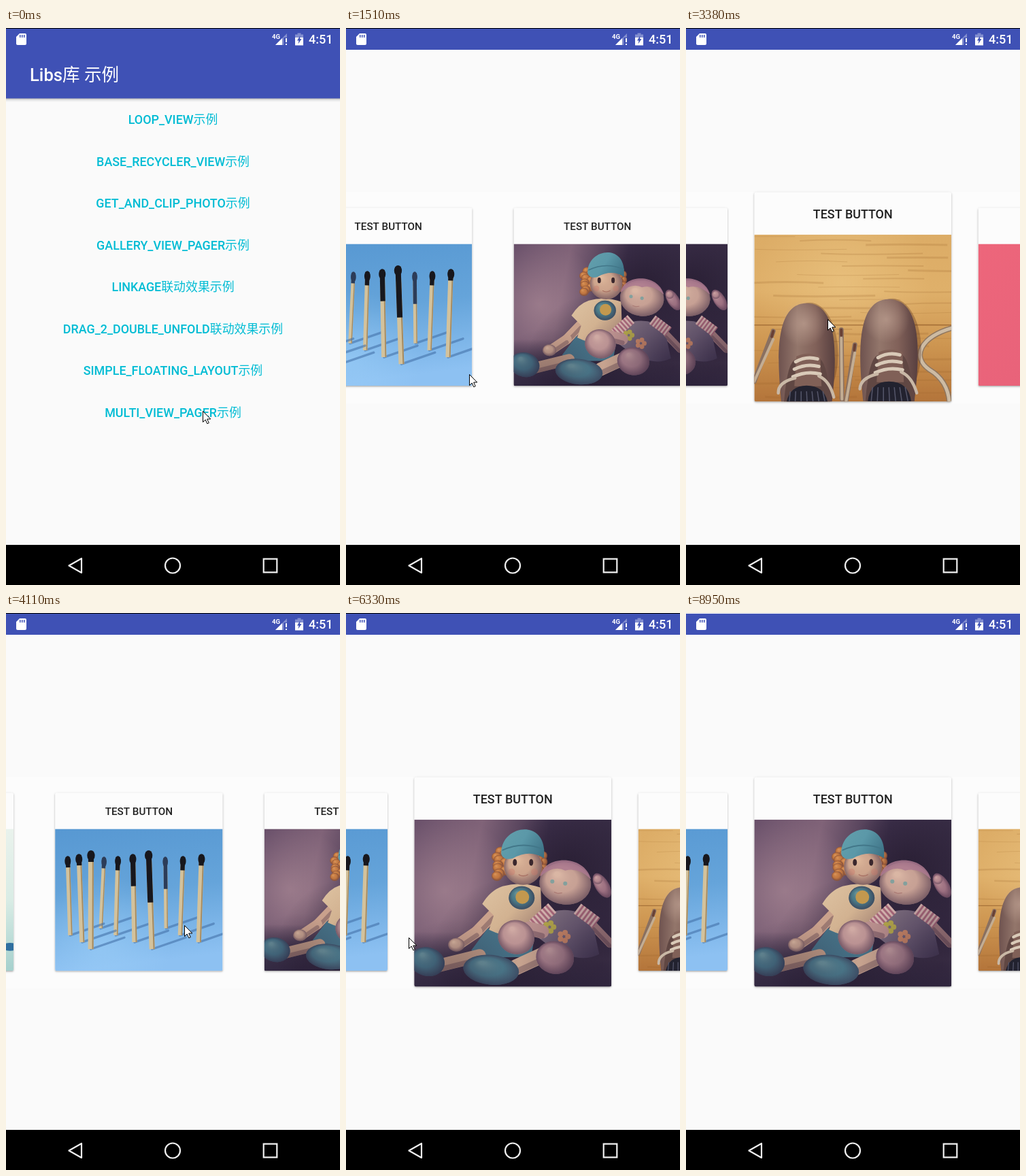
Animation, 491 px wide and 819 px high, one loop 9050 ms. Source, as an HTML page with a canvas:

```html
<!DOCTYPE html>
<html lang="zh-CN">
<head>
<meta charset="utf-8">
<title>View pager</title>
<style>
html, body { margin: 0; width: 100%; height: 100%; overflow: hidden; background: #fafafa; }
canvas { display: block; }
</style>
</head>
<body>
<canvas id="stage" width="491" height="819"></canvas>
<script>
const c = document.getElementById('stage').getContext('2d');
const W = 491, LOOP = 9050, TAU = Math.PI * 2;
const FONT = 'Roboto, "Noto Sans CJK SC", "Noto Sans CJK JP", "Noto Sans CJK", sans-serif';
const BLUE = '#3f51b5', PAPER = '#fafafa', VEIL = 'rgba(255,255,255,.35)';
const CENTER = 245.25, MIDDLE = 395.2, GAP = 307.5;
const HALF = 145, TOP = -154, SPLIT = -91.5, BOTTOM = 154;

const MENU = ['LOOP_VIEW示例', 'BASE_RECYCLER_VIEW示例', 'GET_AND_CLIP_PHOTO示例', 'GALLERY_VIEW_PAGER示例',
  'LINKAGE联动效果示例', 'DRAG_2_DOUBLE_UNFOLD联动效果示例', 'SIMPLE_FLOATING_LAYOUT示例', 'MULTI_VIEW_PAGER示例'];

// The screen only refreshes within these spans, about every STEP ms.
const STEP = 134;
const SPANS = [[460, 1510, 2840], [3140, 3380, 4110, 5380, 7260], [7510, 7780], [8080, 8330], [8950]];

// Swipes: start, page reached, duration.
const SWIPES = [[1000, 1], [1379, 2], [1720, 3], [2060, 4], [3020, 3], [3420, 2], [3895, 1], [4260, 0],
  [4700, 1], [5159, 2], [5540, 3], [5940, 2], [6330, 2.384, 930], [7420, 2]];

// Pointer stops: time, x, y.
const STOPS = [[600, 289, 563], [1510, 181, 509], [2420, 208, 273], [2840, 307, 273], [3380, 208, 428],
  [4110, 262, 459], [5380, 204, 474], [7260, -20, 480]];

function refreshed(clock) {
  let last = 0;
  for (const marks of SPANS) marks.forEach((b, i) => {
    const a = i ? marks[i - 1] : b, n = Math.max(1, Math.round((b - a) / STEP));
    for (let j = 1; j <= n; j++) {
      const tick = Math.round(a + (b - a) * j / n);
      if (tick <= clock) last = tick;
    }
  });
  return last;
}

function pageAt(t) {
  let page = 0;
  for (const [start, target, span = 360] of SWIPES) {
    const k = Math.min(1, Math.max(0, (t - start) / span));
    page += (target - page) * k * (2 - k);
  }
  return page;
}

function pointerAt(t) {
  const i = Math.max(1, STOPS.findIndex(s => s[0] >= t));
  const [t0, x0, y0] = STOPS[i - 1], [t1, x1, y1] = STOPS[i];
  const p = Math.max(0, (t - t0) / (t1 - t0)), k = p * p * (3 - 2 * p);
  return [x0 + (x1 - x0) * k, y0 + (y1 - y0) * k];
}

function rect(color, x, y, w, h) {
  c.fillStyle = color;
  c.fillRect(x, y, w, h);
}
function oval(color, x, y, rx, ry = rx, turn = 0) {
  c.fillStyle = color;
  c.beginPath();
  c.ellipse(x, y, rx, ry, turn, 0, TAU);
  c.fill();
}
function trace(pts) {
  c.beginPath();
  for (let i = 0; i < pts.length; i += 2) c.lineTo(pts[i], pts[i + 1]);
}
function poly(color, ...pts) {
  c.fillStyle = color;
  trace(pts);
  c.fill();
}
function line(color, width, ...pts) {
  c.strokeStyle = color;
  c.lineWidth = width;
  trace(pts);
  c.stroke();
}
function curve(color, width, path) {
  c.strokeStyle = color;
  c.lineWidth = width;
  c.stroke(new Path2D(path));
}
function shape(color, path) {
  c.fillStyle = color;
  c.fill(new Path2D(path));
}
function fade(x0, y0, x1, y1, ...colors) {
  const g = c.createLinearGradient(x0, y0, x1, y1);
  colors.forEach((v, i) => g.addColorStop(i / (colors.length - 1), v));
  return g;
}
function glow(rgb, alpha, x, y, r) {
  const g = c.createRadialGradient(x, y, 0, x, y, r);
  g.addColorStop(0, `rgba(${rgb},${alpha})`);
  g.addColorStop(1, `rgba(${rgb},0)`);
  rect(g, x - r, y - r, r * 2, r * 2);
}
// Oval lit from the upper left.
function ball(color, x, y, rx, ry = rx, turn = 0) {
  oval(color, x, y, rx, ry, turn);
  c.save();
  c.translate(x, y);
  c.rotate(turn);
  c.scale(rx, ry);
  const g = c.createRadialGradient(-.35, -.4, .1, 0, 0, 1);
  g.addColorStop(0, 'rgba(255,235,205,.16)');
  g.addColorStop(.55, 'rgba(60,30,60,.08)');
  g.addColorStop(1, 'rgba(45,25,55,.5)');
  oval(g, 0, 0, 1);
  c.restore();
}
function limb(color, width, x0, y0, x1, y1) {
  line(color, width, x0, y0, x1, y1);
  line('rgba(55,30,55,.3)', width * .4, x0, y0 + width * .3, x1, y1 + width * .3);
}
function text(s, x, y, size, color, align = 'center', weight = 500) {
  c.font = `${weight} ${size}px ${FONT}`;
  c.textAlign = align;
  c.fillStyle = color;
  c.fillText(s, x, y);
}

// Photos are painted on a 290 x 246 area.
function seaside() {
  rect(fade(0, 0, 0, 246, '#e9f2ec', '#d9ece5', '#a5d0cd'), 0, 0, 290, 246);
  oval('#2f6fa0', 284, 204, 14, 7);
}

function match(i, near) {
  const x = 22 + 18.5 * i + .8 * i * i, y = 50 - 1.2 * near * near;
  const fx = x + 6 * Math.sin(1.2 * i + .8), fy = 172 + 12 * near;
  const w = 6.5 + near, char = near ? '#17171d' : '#2c3c58';
  const burnt = 18 + 70 * Math.exp(-((i - 6) ** 2) / 1.5), p = burnt / (fy - y);
  c.lineCap = 'round';
  line('rgba(62,108,165,.55)', 4, fx, fy, fx + 58, fy - 20);
  c.lineCap = 'butt';
  line('#d3c29c', w, x, y, fx, fy);
  line('#a58a60', w * .25, x + w * .36, y, fx + w * .36, fy);
  line(char, w, x, y, x + (fx - x) * p, y + burnt);
  oval(char, x, y + 7, w * .7, 9);
}
function matches() {
  rect(fade(0, 0, 30, 246, '#5798d2', '#65a4da', '#8dc1f2'), 0, 0, 290, 246);
  glow('160,210,250', .5, 80, 200, 120);
  for (let near = 0; near < 4; near++)
    for (let i = 0; i < 10; i++) if ((i + 1) % 4 === near) match(i, near);
}

function boy() {
  c.lineCap = 'round';
  limb('#c9a18c', 17, 116, 140, 92, 165);
  limb('#c9a18c', 17, 92, 165, 64, 184);
  ball('#d3ad96', 62, 184, 12, 10);
  shape('#456f84', 'M108 160 L178 165 L172 202 L95 203 L84 192 Z');
  limb('#bd9883', 19, 96, 200, 35, 215);
  ball('#477a8d', 19, 209, 26, 21, .25);
  limb('#c7a38f', 23, 187, 200, 150, 217);
  ball('#4d8394', 113, 221, 41, 22, .1);
  shape(fade(110, 100, 180, 170, '#dcc09f', '#d2b291', '#9c7c70'),
    'M130 98 Q158 90 186 100 L188 168 Q146 180 110 162 L117 141 L100 124 Q112 104 130 98 Z');
  ball('#4a818d', 158, 115, 19, 17);
  oval('#c2984e', 159, 114, 10);
  for (let i = 0; i < 10; i++) {
    ball('#cf8040', 127 + 7 * Math.sin(i * 2), 47 + i * 4, 8, 7);
    ball('#b9703c', 187 + 4 * Math.sin(i * 2), 50 + i * 3, 5, 6);
  }
  ball('#dab093', 160, 69, 28, 27);
  for (const x of [148, 172]) {
    oval('#3a272d', x, 63, 3, 5);
    oval('rgba(200,120,105,.4)', x + (x - 160) * .4, 77, 5);
  }
  curve('#a56c5f', 1.2, 'M154 81 Q160 85 167 81');
  shape(fade(128, 12, 191, 50, '#63a0ac', '#5b98a8', '#3d7185'),
    'M128 51 C126 10 188 -2 191 45 L191 57 Q170 43 145 57 Q132 61 128 51 Z');
  curve('#427789', 2, 'M130 45 Q160 31 190 44');
}

function girl() {
  limb('#a98080', 13, 264, 157, 288, 182);
  ball('#a97b8a', 276, 97, 10, 20, -.55);
  ball('#bf9197', 270, 88, 7);
  shape(fade(190, 135, 265, 200, '#80707f', '#6f6077', '#4f4460'),
    'M192 139 Q218 128 243 137 L265 165 L272 198 Q240 214 196 184 L178 170 Z');
  c.lineCap = 'butt';
  for (const arm of [[203, 130, 175, 155], [240, 131, 268, 152]]) {
    line('#a76779', 18, ...arm);
    c.setLineDash([3, 3]);
    line('#d3b2ad', 18, ...arm);
    c.setLineDash([]);
  }
  c.lineCap = 'round';
  ball('#d3ac9c', 222, 94, 38, 31, .1);
  shape('rgba(172,122,144,.85)', 'M185 84 C190 52 250 50 260 88 Q242 70 222 75 Q205 66 185 84 Z');
  oval('#83a09d', 203, 91, 3);
  oval('#83a09d', 222, 94, 3);
  curve('#a5726d', 1, 'M206 107 Q211 110 217 108');
  for (const [color, x, y] of [['#b5a84a', 199, 158], ['#cf8a68', 220, 172]])
    for (let i = 0; i < 5; i++)
      oval(color, x + 6 * Math.cos(i * TAU / 5), y + 6 * Math.sin(i * TAU / 5), 4);
  limb('#b98f8d', 20, 168, 160, 188, 165);
  ball('#c69d9b', 150, 173, 27, 25, .3);
  ball('#b58b95', 207, 203, 28, 24, .2);
}

function dolls() {
  rect(fade(0, 0, 290, 60, '#69506a', '#806378', '#3c2f4a', '#352a42'), 0, 0, 290, 246);
  glow('165,132,146', .75, 45, 105, 110);
  glow('38,28,48', .85, 225, 75, 95);
  rect(fade(0, 165, 0, 246, 'rgba(58,46,70,0)', '#43384f', '#352c45'), 0, 165, 290, 81);
  glow('30,20,40', .6, 150, 215, 130);
  boy();
  girl();
  glow('35,22,45', .45, 275, 215, 120);
  glow('35,22,45', .35, 60, 246, 100);
}

function shoe(x, y, w) {
  c.save();
  c.translate(x, y);
  oval('rgba(70,35,20,.3)', w * .06, 75, w * .52, 76);
  shape(fade(-w / 2, 0, w / 2, 0, '#705450', '#93766b', '#816159', '#5a4141'),
    `M${-w * .46} 150 C${-w * .5} 110 ${-w * .68} 0 0 0 C${w * .68} 0 ${w * .52} 105 ${w * .46} 150 Z`);
  glow('195,165,150', .65, -4, 30, 34);
  shape('#604743', `M${-w * .42} 150 Q${-w * .36} 84 -15 82 L20 82 Q${w * .4} 92 ${w * .44} 150 Z`);
  shape('#806057', 'M-15 78 Q3 70 20 78 L22 122 L-18 122 Z');
  shape('#22222f', `M${-w * .38} 150 Q${-w * .33} 121 0 121 Q${w * .35} 121 ${w * .4} 150 Z`);
  for (let i = 0; i < 7; i++) line('#55566a', 1.5, -24 + i * 8, 130, -26 + i * 9, 150);
  c.lineCap = 'round';
  for (let i = 0; i < 3; i++) {
    const s = 16 + i * 2, ly = 82 + i * 11;
    curve('#d9cab8', 5, `M${-s} ${ly + 4} Q0 ${ly - 5} ${s} ${ly}`);
  }
  curve('#c9b8a6', 4.5, `M-17 110 Q-42 116 ${-w * .52} 132`);
  curve('#c9b8a6', 4.5, `M18 107 Q34 114 ${w * .5} 138`);
  c.restore();
}
function shoes() {
  rect(fade(0, 0, 0, 246, '#dcac66', '#dfb06a', '#cd9550', '#b3743a'), 0, 0, 290, 246);
  glow('240,205,140', .5, 130, 70, 130);
  for (let i = 0; i < 40; i++) {
    const x = (i * 97) % 260 - 30, y = i * 6.2 + 3, d = 3 * Math.sin(i * 5);
    curve('rgba(150,95,40,.2)', 1 + i % 3, `M${x} ${y} q50 ${d} ${90 + i % 5 * 15} 0`);
  }
  line('rgba(125,70,25,.5)', 1.5, 0, 133, 290, 133);
  c.lineCap = 'round';
  for (const [x, y, ex, ey] of [[28, 142, 0, 216], [128, 140, 129, 242], [148, 162, 135, 246]]) {
    line('#8a7060', 7, x, y, ex, ey);
    line('#c3ad93', 4, x, y + 12, ex, ey);
    line('#694035', 4, x, y, x + (ex - x) * .08, y + 8);
  }
  const lace = 'M292 137 C245 150 230 180 258 199 Q286 216 287 250';
  curve('#8f765f', 8, lace);
  curve('#cdbba3', 5, lace);
  shoe(77, 101, 80);
  shoe(198, 95, 82);
}

function pink() {
  rect(fade(0, 0, 290, 246, '#ed667b', '#e9637a', '#e56078'), 0, 0, 290, 246);
}

const PHOTOS = [seaside, matches, dolls, shoes, pink];

function card(photo, offset) {
  const k = Math.max(.85, 1 - Math.abs(offset) / 333);
  c.save();
  c.translate(CENTER + offset, MIDDLE);
  c.scale(k, k);
  c.beginPath();
  c.roundRect(-HALF, TOP, HALF * 2, BOTTOM - TOP, 3);
  c.shadowColor = 'rgba(0,0,0,.34)';
  c.shadowBlur = 2.5;
  c.shadowOffsetY = 1.2;
  c.fillStyle = '#fcfcfc';
  c.fill();
  c.shadowColor = 'transparent';
  c.clip();
  text('TEST BUTTON', 0, -115.5, 17.9, '#212121');
  c.translate(-HALF, SPLIT);
  c.beginPath();
  c.rect(0, 0, 290, 246);
  c.clip();
  photo();
  c.restore();
}

function gallery(page) {
  rect(PAPER, 0, 32, W, 728);
  rect('#fcfcfc', 0, 241, W, 311);
  rect(BLUE, 0, 0, W, 32);
  PHOTOS.forEach((photo, i) => {
    const offset = (i - page) * GAP;
    if (Math.abs(offset) < 380) card(photo, offset);
  });
}

function menu(t) {
  rect(PAPER, 0, 0, W, 760);
  rect(fade(0, 103, 0, 109, 'rgba(0,0,0,.3)', 'rgba(0,0,0,.08)', 'rgba(0,0,0,0)'), 0, 103, W, 6);
  rect(BLUE, 0, 0, W, 103.5);
  text('Libs库 示例', 35, 78, 25.6, '#fff', 'left');
  if (t >= 460) {
    c.save();
    c.beginPath();
    c.rect(5, 543, 481, 46);
    c.clip();
    oval('rgba(0,0,0,.1)', 289, 565, 60 + (t - 460) * .9);
    c.restore();
  }
  MENU.forEach((s, i) => text(s, 245.5, 141.3 + i * 61.5, 17.9, '#00bcd4'));
}

function statusBar() {
  rect(BLUE, 0, 0, W, 32);
  shape('#fff', 'M20 8 H28 Q30 8 30 10 V23 Q30 25 28 25 H17 Q15 25 15 23 V13 Z');
  for (let i = 0; i < 3; i++) rect(BLUE, 20 + i * 3, 10, 1.5, 4);
  text('4G', 391, 16, 9.5, '#fff', 'left', 700);
  poly(VEIL, 396, 25, 413, 8, 413, 25);
  poly('#fff', 396, 25, 406, 15, 406, 25);
  rect(BLUE, 408.5, 14, 5, 11);
  rect('#fff', 411, 15, 2, 6);
  rect('#fff', 411, 23, 2, 2);
  rect(VEIL, 425, 9.5, 12, 5);
  rect(VEIL, 428.5, 7.5, 5, 2);
  rect('#fff', 425, 14, 12, 11.5);
  poly(BLUE, 432.5, 11, 428, 18.5, 430.5, 18.5, 429.5, 23.5, 434.5, 16, 432, 16);
  text('4:51', 480.5, 23.3, 18, '#fff', 'right');
}

function navBar() {
  rect('#000', 0, 760, W, 59);
  c.lineJoin = 'round';
  curve('#f0f0f0', 2.2, 'M92.5 790.5 L111 780 V801 Z');
  curve('#f0f0f0', 2.2, 'M256 790.5 A11 11 0 1 1 234 790.5 A11 11 0 1 1 256 790.5 Z');
  c.lineJoin = 'miter';
  curve('#f0f0f0', 2.2, 'M378.7 780.7 H398.3 V800.3 H378.7 Z');
}

function cursor(x, y) {
  c.save();
  c.translate(x + .5, y + .5);
  const arrow = 'M0 0 V16 L3.7 12.5 L6.3 18.3 L8.8 17.2 L6.2 11.5 H11.3 Z';
  shape('#fff', arrow);
  curve('#000', 1, arrow);
  c.restore();
}

function draw(now) {
  const t = refreshed(now % LOOP);
  const enter = Math.min(1, Math.max(0, (t - 600) / 270));
  c.lineCap = 'butt';
  if (enter < 1) menu(t);
  if (enter > 0) {
    const rest = (1 - enter) ** 2;
    c.save();
    c.globalAlpha = 1 - rest;
    c.translate(0, rest * 65);
    gallery(pageAt(t));
    c.restore();
  }
  statusBar();
  navBar();
  rect(t >= 8950 ? PAPER : '#000', 0, 0, W, 1);
  if (t < 7260) cursor(...pointerAt(t));
  else if (t >= 8080 && t < 8330) cursor(460 + (t - 8080) * .1, 732 + (t - 8080) * .4);
}

const start = performance.now();
function loop() {
  draw(performance.now() - start);
  requestAnimationFrame(loop);
}
loop();
</script>
</body>
</html>
```
